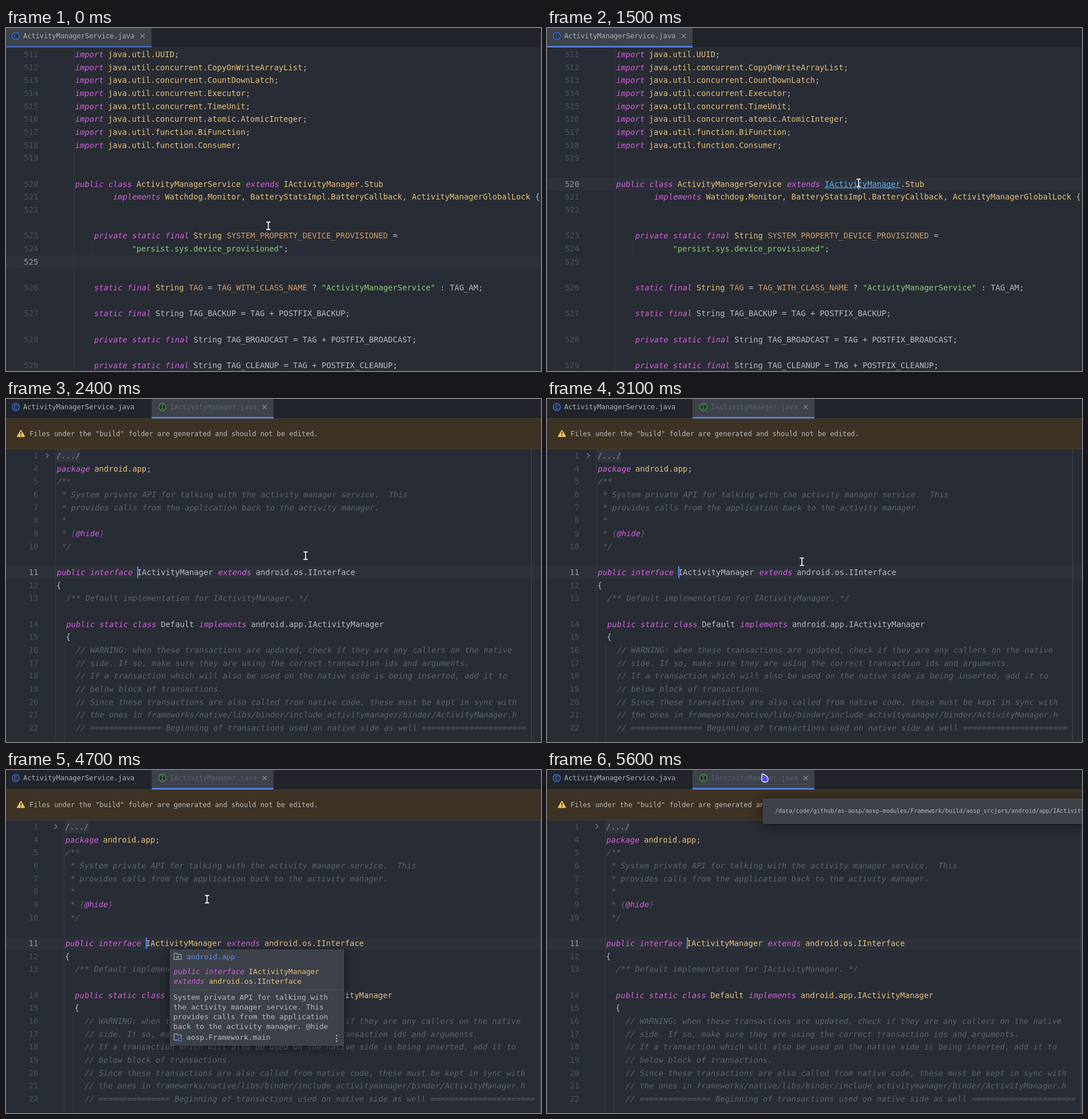
These frames come from a looping animation (934 px wide and 600 px high, 8 s). An HTML page with a canvas:

```html
<!DOCTYPE html>
<html lang="en">
<head>
<meta charset="utf-8">
<title>Editor: go to declaration</title>
<style>
  html, body { margin: 0; width: 100%; height: 100%; overflow: hidden; background: #282c34; }
  canvas { display: block; }
</style>
</head>
<body>
<canvas id="stage" width="934" height="600"></canvas>
<script>
const ctx = document.getElementById('stage').getContext('2d');
const W = 934, H = 600, LOOP = 8000;
const CW = 8.287, ROW = 22.67, ADVANCE = 0.602;
const C = {
  bg: '#282c34', bar: '#21252b', tab: '#3d424b', row: '#2d313a', line: '#353a43',
  text: '#b6bac2', num: '#495162', numOn: '#9298a4', comment: '#5c6370',
  key: '#d55fde', type: '#e5c07b', konst: '#d19a66', str: '#89ca78',
  link: '#61afef', accent: '#5a87ee', caret: '#528bff'
};

// Markup: [type] <constant> |resolved later|
const serviceFile = {
  x: 120, gutter: 118,
  rows: [
    [511, 'import [java.util.UUID];'],
    [512, 'import [java.util.concurrent.CopyOnWriteArrayList];'],
    [513, 'import [java.util.concurrent.CountDownLatch];'],
    [514, 'import [java.util.concurrent.Executor];'],
    [515, 'import [java.util.concurrent.TimeUnit];'],
    [516, 'import [java.util.concurrent.atomic.AtomicInteger];'],
    [517, 'import [java.util.function.BiFunction];'],
    [518, 'import [java.util.function.Consumer];'],
    [519], [],
    [520, 'public class [ActivityManagerService] extends |IActivityManager|[.Stub]'],
    [521, '        implements [Watchdog.Monitor], [BatteryStatsImpl.BatteryCallback], [ActivityManagerGlobalLock] {'],
    [522], [],
    [523, '    private static final [String] <SYSTEM_PROPERTY_DEVICE_PROVISIONED> ='],
    [524, '            "persist.sys.device_provisioned";'],
    [525], [],
    [526, '    static final [String] <TAG> = <TAG_WITH_CLASS_NAME> ? "ActivityManagerService" : TAG_AM;'],
    [],
    [527, '    static final String TAG_BACKUP = TAG + POSTFIX_BACKUP;'],
    [],
    [528, '    private static final String TAG_BROADCAST = TAG + POSTFIX_BROADCAST;'],
    [],
    [529, '    private static final String TAG_CLEANUP = TAG + POSTFIX_CLEANUP;']
  ]
};
const interfaceRows = [
  [1],
  [4, 'package [android.app];'],
  [5, '/**'],
  [6, ' * System private API for talking with the activity manager service.  This'],
  [7, ' * provides calls from the application back to the activity manager.'],
  [8, ' *'],
  [9, ' * {@hide}'],
  [10, ' */'],
  [],
  [11, 'public interface |IActivityManager| extends |android.os.IInterface|'],
  [12, '{'],
  [13, '  /** Default implementation for IActivityManager. */'],
  [],
  [14, '  public static class |Default| implements |android.app.IActivityManager|'],
  [15, '  {'],
  [16, '    // WARNING: when these transactions are updated, check if they are any callers on the native'],
  [17, '    // side. If so, make sure they are using the correct transaction ids and arguments.'],
  [18, '    // If a transaction which will also be used on the native side is being inserted, add it to'],
  [19, '    // below block of transactions.'],
  [20, '    // Since these transactions are also called from native code, these must be kept in sync with'],
  [21, '    // the ones in frameworks/native/libs/binder/include_activitymanager/binder/ActivityManager.h'],
  [22, '    // ' + '='.repeat(15) + ' Beginning of transactions used on native side as well ' + '='.repeat(22)],
  [],
  [23, '    @Override public android.os.ParcelFileDescriptor openContentUri(java.lang.String uriString) throws'],
  [24, '    {']
];

const TOKEN = new RegExp([
  '(?<comment>\\/\\*.*|\\/\\/.*|^ \\*[^@]*|\\})', '(?<str>"[^"]*")',
  '\\[(?<type>[^\\]]*)\\]', '<(?<konst>[^>]*)>', '\\|(?<late>[^|]*)\\|',
  '(?<key>@hide|\\b(?:import|public|class|extends|implements|private|static|final|package|interface|throws)\\b)',
  '(?<text>\\s+|[\\w.]+|.)'
].join('|'), 'g');

function rect(x, y, w, h, color) {
  ctx.fillStyle = color;
  ctx.fillRect(x, y, w, h);
}

// Text centred vertically on y, sized by its column width.
function write(s, x, y, color, cw = CW, slant = false) {
  const size = cw / ADVANCE;
  ctx.save();
  ctx.translate(x, y + size * 0.365);
  if (slant) ctx.transform(1, 0, -0.17, 1, 0, 0);
  ctx.font = `${size}px "DejaVu Sans Mono", "Noto Sans Mono", monospace`;
  ctx.fillStyle = color;
  ctx.fillText(s, 0, 0);
  ctx.restore();
}

function writeCode(s, x, y, colors, cw = CW) {
  let col = 0;
  for (const { groups } of s.matchAll(TOKEN)) {
    const [kind, body] = Object.entries(groups).find(([, v]) => v !== undefined);
    const slant = kind === 'key' || kind === 'comment';
    if (body.trim()) write(body, x + col * cw, y, colors[kind], cw, slant);
    col += body.length;
  }
}

function stroke(color, width, draw) {
  ctx.strokeStyle = color;
  ctx.lineWidth = width;
  ctx.beginPath();
  draw();
  ctx.stroke();
}

function polyline(...pts) {
  pts.forEach(([x, y], i) => i ? ctx.lineTo(x, y) : ctx.moveTo(x, y));
}

function badge(x, letter, color, fill) {
  ctx.fillStyle = fill;
  stroke(color, 1.2, () => { ctx.arc(x, 14, 6.3, 0, 7); ctx.fill(); });
  write(letter, x - 2.9, 14, color, 5.8);
}

function tab(x, w, active, title, letter, color, fill, textColor, underline) {
  if (active) {
    rect(x, 0, w, 34, C.tab);
    rect(x, 31.5, w, 2.5, underline);
    const cx = x + w - 15.5;
    stroke('#8b919c', 1.1, () => {
      polyline([cx - 3.5, 10.5], [cx + 3.5, 17.5]);
      polyline([cx + 3.5, 10.5], [cx - 3.5, 17.5]);
    });
  }
  badge(x + (x ? 19 : 17), letter, color, fill);
  write(title, x + (x ? 32.5 : 30), 14, textColor, 7.2);
}

function tabs(opened, underline) {
  rect(0, 0, W, 34, C.bar);
  tab(0, 254, !opened, 'ActivityManagerService.java', 'C', '#4474d6', '#25324d', '#a9afba', underline);
  if (opened) tab(254, 213, true, 'IActivityManager.java', 'I', '#4f9e55', '#253627', '#5b616c', C.accent);
}

function editor(file, top, current, colors) {
  const yOf = i => top + ROW * i;
  const at = file.rows.findIndex(r => r[0] === current);
  rect(0, yOf(at) - 11.3, W, ROW, C.row);
  rect(file.gutter, 34, 1, H, C.line);
  file.rows.forEach(([n, s], i) => {
    if (!n) return;
    write(String(n), 56.2 - String(n).length * CW, yOf(i), n === current ? C.numOn : C.num);
    if (s) writeCode(s, file.x, yOf(i), colors);
  });
}

function caret(x, y) {
  rect(Math.round(x), Math.round(y) - 10, 2, 20, C.caret);
}

function serviceView(t) {
  const clicked = t >= 1400, link = t >= 700;
  editor(serviceFile, 46, clicked ? 520 : 525, { ...C, late: link ? C.link : C.type });
  rect(150, 375, 1, 23, C.line);
  if (link) rect(484.6, 279, 16 * CW, 1.2, C.link);
  if (clicked) caret(543, 273);
}

function banner() {
  rect(0, 34, W, 54, '#4d402d');
  rect(0, 35, W, 52, '#3d3223');
  ctx.fillStyle = '#f0c35c';
  ctx.lineJoin = 'round';
  stroke('#f0c35c', 2, () => {
    polyline([26, 55], [32, 65.5], [20, 65.5]);
    ctx.closePath();
    ctx.fill();
  });
  rect(25.2, 57, 1.7, 5, '#3d3223');
  rect(25.2, 63.2, 1.7, 1.7, '#3d3223');
  write('Files under the "build" folder are generated and should not be edited.', 41, 61, C.text, 7.2);
}

function interfaceView(t) {
  const warned = t >= 2300, resolved = t >= 3200;
  const top = warned ? 99 : 46, x = resolved ? 103 : 88;
  const colors = { ...C, type: t >= 2400 ? C.type : C.text, late: resolved ? C.type : C.text };
  editor({ x, gutter: x - 2, rows: interfaceRows }, top, 11, colors);
  rect(x + 829, 34, 1, H, '#434851');
  if (warned) rect(x + 14, top + ROW * 15 - 11, 1, H, C.line);
  rect(x, top - 11, 41.5, 22, '#31363f');
  write('/.../', x, top, '#8a909b');
  stroke('#7d838e', 1.2, () => polyline([x - 18, top - 4], [x - 14, top], [x - 18, top + 4]));
  caret(x + 17 * CW, top + ROW * 9);
  if (warned) banner();
}

function panel(x, y, w, h, blur) {
  ctx.save();
  ctx.shadowColor = 'rgba(0,0,0,.5)';
  ctx.shadowBlur = blur;
  ctx.shadowOffsetY = 3;
  rect(x, y, w, h, '#474b54');
  ctx.restore();
  rect(x + 1, y + 1, w - 2, h - 2, '#3d4149');
}

function folder(y) {
  stroke('#b0b5be', 1.1, () => {
    polyline([293.5, y - 5.5], [298, y - 5.5], [300, y - 3.5], [306, y - 3.5], [306, y + 5.5], [293.5, y + 5.5]);
    ctx.closePath();
  });
}

function docPopup() {
  const cw = 7.735;
  panel(286, 314, 304, 168, 20);
  folder(326);
  stroke('#b0b5be', 1.1, () => ctx.arc(299.7, 327.5, 1.8, 0, 7));
  write('android.app', 315, 326, '#5a8ff0', cw);
  writeCode('public interface [IActivityManager]', 292, 352, C, cw);
  writeCode('extends [android.os.IInterface]', 292, 369, C, cw);
  rect(287, 384, 302, 1, '#4d525b');
  ['System private API for talking with', 'the activity manager service. This',
    'provides calls from the application', 'back to the activity manager. @hide'
  ].forEach((s, i) => write(s, 292, 397 + i * 17.1, C.text, cw));
  folder(467);
  rect(300, 468, 8, 7, '#3d4149');
  ctx.fillStyle = '#25324d';
  stroke('#548af7', 1.2, () => { ctx.rect(301.5, 469.5, 5, 4.5); ctx.fill(); });
  write('aosp.Framework.main', 315, 467, C.text, cw);
  for (let i = 0; i < 3; i++) rect(576.2, 463.5 + i * 5, 2, 2, '#ced0d6');
}

function pathTip() {
  panel(377, 50, 580, 44, 20);
  write('/data/code/github/as-aosp/aosp-modules/Framework/build/aosp_srcjars/android/app/IActivityManager.java',
    398, 71.5, C.text, 6.07);
}

// Mouse way points: time, x, y
const WAY = [
  [0, 458, 346], [100, 458, 346], [300, 434, 349], [800, 541, 283], [900, 541, 283],
  [1000, 546, 280], [1300, 546, 280], [1400, 544, 272], [1500, 544, 271],
  [1600, 548, 279], [2100, 548, 279], [2400, 523, 274], [3000, 523, 274],
  [3300, 289, 306], [3800, 289, 306], [3900, 287, 307], [4000, 287, 307],
  [4100, 290, 305], [4600, 290, 305], [4700, 351, 226], [4900, 351, 226],
  [5000, 381, 15], [5200, 381, 15], [5300, 380, 14], [LOOP, 380, 14]
];

function mouseAt(t) {
  const i = WAY.findIndex(p => p[0] > t);
  const [t0, x0, y0] = WAY[i - 1], [t1, x1, y1] = WAY[i];
  const k = (t - t0) / (t1 - t0);
  return [x0 + (x1 - x0) * k, y0 + (y1 - y0) * k];
}

function beam(x, y) {
  const shape = () => {
    polyline([x - 2.8, y - 6.5], [x + 2.8, y - 6.5]);
    polyline([x, y - 6.5], [x, y + 6.5]);
    polyline([x - 2.8, y + 6.5], [x + 2.8, y + 6.5]);
  };
  ctx.lineCap = 'square';
  stroke('#1d2026', 3.4, shape);
  stroke('#f2f2f4', 1.8, shape);
  ctx.lineCap = 'butt';
}

function drop(x, y) {
  ctx.fillStyle = '#5550f2';
  ctx.lineJoin = 'round';
  stroke('#ffffff', 1.3, () => {
    ctx.moveTo(x - 4.5, y - 7.3);
    ctx.bezierCurveTo(x + 1, y - 6.2, x + 6, y - 2, x + 6, y + 2);
    ctx.bezierCurveTo(x + 6, y + 9.2, x - 5.2, y + 9.2, x - 5.2, y + 2);
    ctx.bezierCurveTo(x - 5.2, y - 1, x - 5.4, y - 4, x - 4.5, y - 7.3);
    ctx.closePath();
    ctx.fill();
  });
}

function draw(ms) {
  const t = Math.floor((ms % LOOP) / 100) * 100;
  const opened = t >= 1600;
  rect(0, 0, W, H, C.bg);
  if (!opened) serviceView(t);
  else if (t >= 2000) interfaceView(t);
  tabs(opened, t < 1400 ? '#4467b8' : C.accent);
  if (t >= 4000 && t < 5000) docPopup();
  if (t >= 5600) pathTip();
  const pointer = (opened && t < 2200) || t >= 5000 ? drop : beam;
  pointer(...mouseAt(t));
}

const start = performance.now();
function tick() {
  draw(performance.now() - start);
  requestAnimationFrame(tick);
}
tick();
</script>
</body>
</html>
```
